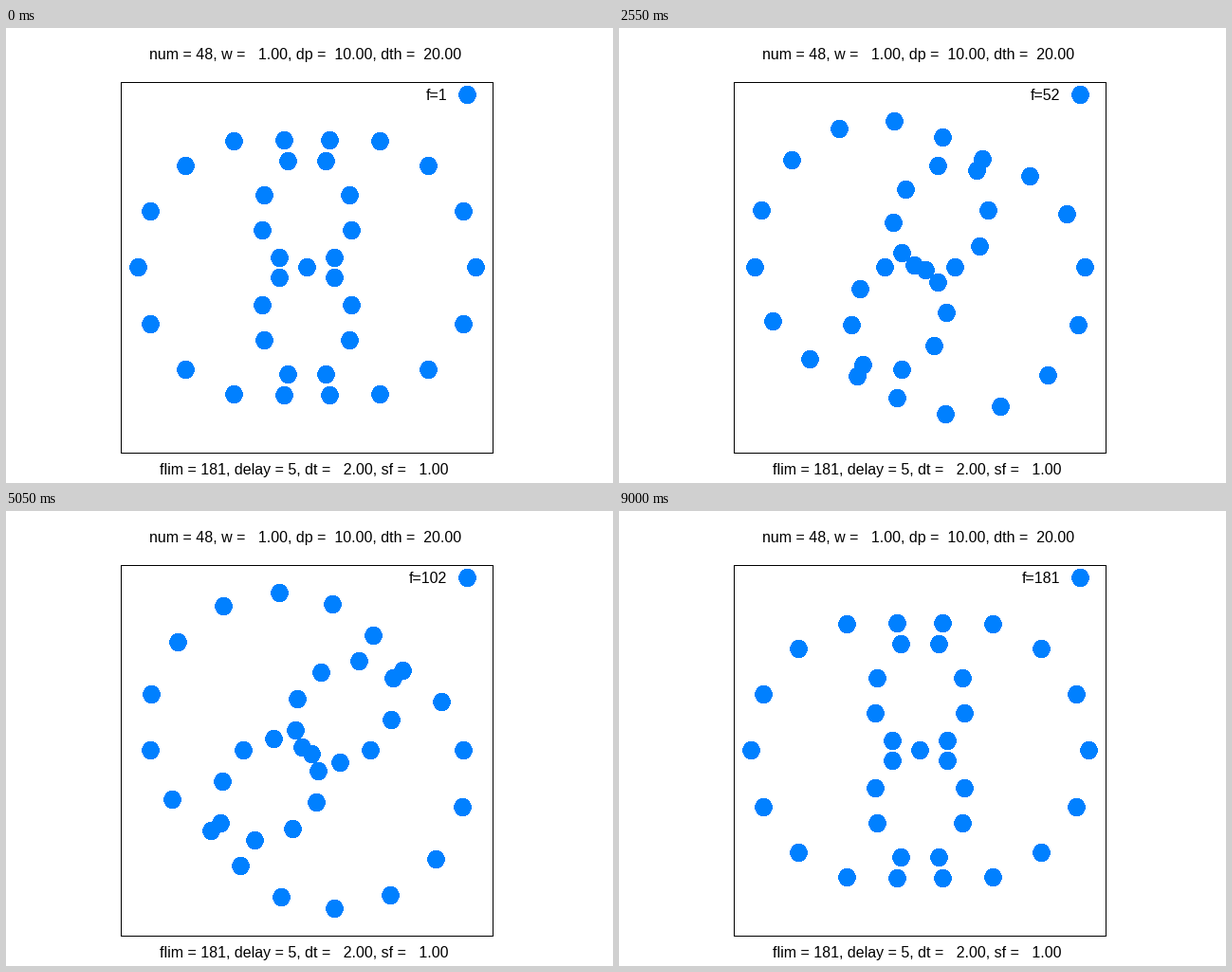
These frames come from a looping animation (640x480 px, 9050 ms). A matplotlib script:

```python
import numpy as np
import matplotlib.pyplot as plt
from matplotlib.animation import FuncAnimation
from matplotlib.patches import Ellipse, Rectangle

W, H, DPI = 640, 480, 100
NUM, OMEGA, DP, DTH = 48, 1.0, 10.0, 20.0
FRAMES, DELAY, DT, SF = 181, 5, 2.0, 1.0
LEFT, TOP, BOX_W, BOX_H = 121, 57, 392, 391
LIMIT = 1.1
BLUE = "#0080ff"
FONT = dict(family="Liberation Sans", size=16 * 72 / DPI, color="black")

fig = plt.figure(figsize=(W / DPI, H / DPI), dpi=DPI, facecolor="white")
ax = fig.add_axes([0, 0, 1, 1])
ax.set_xlim(0, W)
ax.set_ylim(H, 0)
ax.axis("off")


def to_pixel(x, y):
    """Map plot units to whole pixels, rounding upwards from the bottom edge."""
    px = LEFT + BOX_W * (x + LIMIT) / (2 * LIMIT)
    up = H - 1 - TOP - BOX_H + BOX_H * (y + LIMIT) / (2 * LIMIT)
    snap = lambda v: np.floor(v + 0.5 + 1e-9)
    return snap(px), H - 1 - snap(up)


def centre(px, py):
    return px + 0.5, py + 0.5


def add_dot(px=0, py=0):
    dot = Ellipse(centre(px, py), 17.2, 18.4, facecolor=BLUE,
                  edgecolor="none", antialiased=False, zorder=2)
    return ax.add_patch(dot)


def add_panel(inset, color):
    """Fill the plot box, shrunk by whole pixels on every side."""
    ax.add_patch(Rectangle((LEFT + inset, TOP + inset),
                           BOX_W + 1 - 2 * inset, BOX_H + 1 - 2 * inset,
                           facecolor=color, edgecolor="none",
                           antialiased=False, zorder=1))


# black under white leaves a crisp one-pixel frame
add_panel(0, "black")
add_panel(1, "white")

ax.text(315.5, 33,
        f"num = {NUM}, w = {OMEGA:6.2f}, dp = {DP:6.2f}, dth = {DTH:6.2f}",
        ha="center", va="baseline", **FONT)
ax.text(314.5, 471,
        f"flim = {FRAMES}, delay = {DELAY}, dt = {DT:6.2f}, sf = {SF:6.2f}",
        ha="center", va="baseline", **FONT)
label = ax.text(465, 75.5, "", ha="right", va="baseline", **FONT)

add_dot(486, 70)
dots = [add_dot() for _ in range(NUM)]
index = np.arange(NUM)
theta = np.radians(DTH * index)


def update(i):
    # each dot swings along its own diameter, with a steady phase lag
    r = SF * np.cos(np.radians(DP * index + OMEGA * DT * i))
    px, py = to_pixel(r * np.cos(theta), r * np.sin(theta))
    for dot, x, y in zip(dots, px, py):
        dot.set_center(centre(x, y))
    label.set_text(f"f={i + 1}")
    return [*dots, label]


anim = FuncAnimation(fig, update, frames=FRAMES, interval=DELAY * 10,
                     init_func=lambda: update(0), repeat=True, repeat_delay=0)
plt.show()
```
